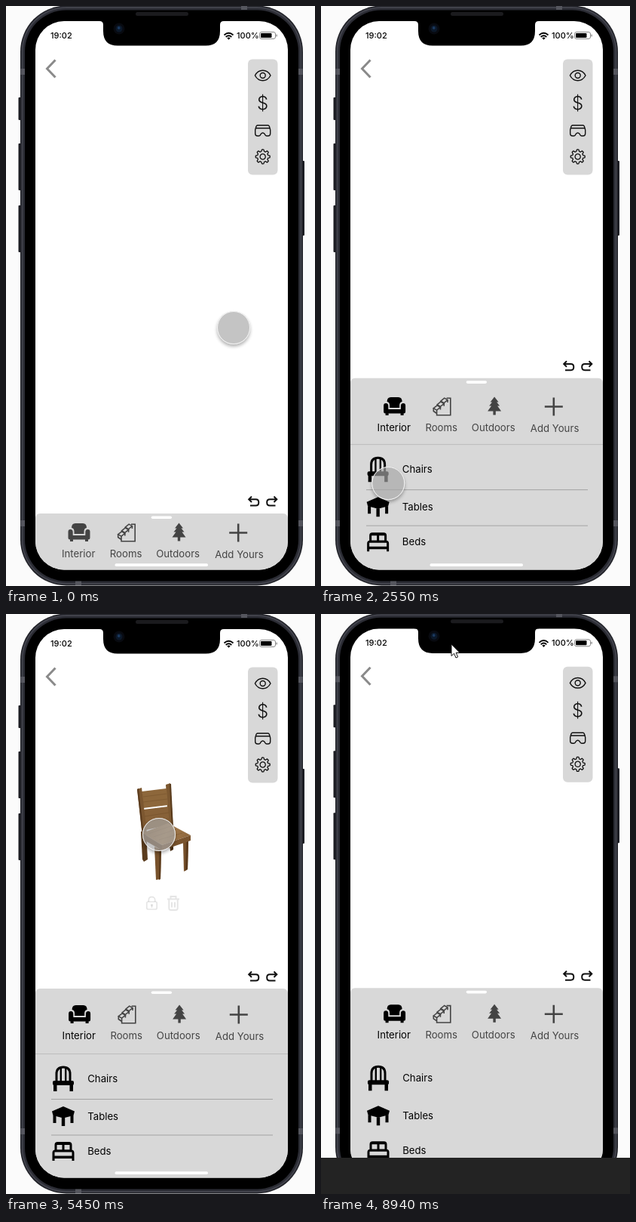
An HTML page with a canvas that plays this animation: 410x768 px, repeating every 8970 ms.

```html
<!DOCTYPE html>
<html lang="en">
<head>
<meta charset="utf-8">
<title>Room planner</title>
<style>
html, body { margin: 0; width: 100%; height: 100%; overflow: hidden; background: #fbfbfb; }
canvas { display: block; width: 410px; height: 768px; }
</style>
</head>
<body>
<canvas id="stage" width="410" height="768"></canvas>
<script>
const ctx = document.getElementById('stage').getContext('2d');
const LOOP = 8970;
const GRAY = '#d8d8d8';
const INK = '#444';

const clamp = v => Math.max(0, Math.min(1, v));

function box(x, y, w, h, r, fill) {
  ctx.beginPath();
  ctx.roundRect(x, y, w, h, r);
  ctx.fillStyle = fill;
  ctx.fill();
}

function at(x, y, alpha, draw) {
  if (alpha <= 0) return;
  ctx.save();
  ctx.globalAlpha *= alpha;
  ctx.translate(x, y);
  draw();
  ctx.restore();
}

function fill(d, color) {
  ctx.fillStyle = color;
  ctx.fill(new Path2D(d), 'evenodd');
}

function stroke(d, color, width) {
  ctx.strokeStyle = color;
  ctx.lineWidth = width;
  ctx.stroke(new Path2D(d));
}

function text(str, x, y, color, size = 13.2, weight = 400, align = 'left') {
  ctx.font = `${weight} ${size}px Inter, sans-serif`;
  ctx.textAlign = align;
  ctx.fillStyle = color;
  ctx.fillText(str, x, y);
}

// Damped spring: angular speed 10/s, damping ratio 0.75.
function spring(t, start) {
  const s = (t - start) / 100;
  if (s <= 0) return 0;
  if (s > 10) return 1;
  const z = 0.75, w = Math.sqrt(1 - z * z);
  return 1 - Math.exp(-z * s) * (Math.cos(w * s) + z / w * Math.sin(w * s));
}

// Opacity of the spring, mirrored past its end.
const fade = p => clamp(1 - Math.abs(1 - p));

const touchPath = [
  [0, 302, 426], [60, 302, 426], [250, 311, 425], [500, 230, 502],
  [910, 117, 602], [1300, 90, 704], [1670, 97, 698], [2100, 97, 698],
  [2750, 87, 613], [2850, 87, 613], [3210, 76, 611], [3700, 76, 611],
  [4050, 100, 550], [4390, 177, 404], [4450, 208, 350], [4600, 218, 282],
  [4900, 212, 285], [5300, 203, 292], [5900, 203, 292], [6210, 208, 327],
  [6270, 219, 359], [6420, 221, 382], [7800, 221, 382], [8060, 195, 131],
  [8150, 191, 64]
];

// Cubic path through the keys, at rest wherever two keys coincide.
function follow(keys, t) {
  const last = keys.length - 1;
  if (t >= keys[last][0]) return keys[last].slice(1);
  const i = keys.findIndex(k => k[0] > t) - 1;
  const a = keys[i], b = keys[i + 1];
  const span = b[0] - a[0], u = (t - a[0]) / span;
  const same = (p, q) => p[1] === q[1] && p[2] === q[2];
  const slope = (n, c) => {
    if (n === 0 || n === last) return 0;
    const p = keys[n - 1], k = keys[n], q = keys[n + 1];
    return same(p, k) || same(k, q) ? 0 : (q[c] - p[c]) / (q[0] - p[0]);
  };
  return [1, 2].map(c => {
    const v = 1 - u;
    return a[c] * (1 + 2 * u) * v * v + b[c] * u * u * (3 - 2 * u) +
      span * u * v * (slope(i, c) * v - slope(i + 1, c) * u);
  });
}

function phoneBody() {
  for (const [y, h] of [[121, 30], [182, 62], [264, 62]]) box(16.5, y, 5, h, 1, '#1c1d23');
  box(391, 205, 5, 99, 1, '#1c1d23');
  box(19, -0.5, 375, 768, 61, '#1f2026');
  box(20.5, 1, 372, 765, 59.5, '#41424b');
  box(22.5, 3, 368, 761, 57.5, '#2b2c34');
  ctx.fillStyle = '#55565e';
  for (const y of [83, 681]) {
    ctx.fillRect(19.5, y, 5.5, 8);
    ctx.fillRect(388, y, 5.5, 8);
  }
  ctx.fillRect(312, 0, 8, 5);
  ctx.fillRect(92, 761, 8, 6);
  box(25, 5.5, 363, 756, 55, '#000');
  box(172, 8, 70, 5, 2.5, '#1b1b1e');
}

function notch() {
  fill('M124 19V20Q129 20 129 25V33Q129 52.6 148 52.6H265Q284 52.6 284 33V25Q284 20 289 20V19Z', '#000');
  at(150, 30, 1, () => {
    box(-7.5, -7.5, 15, 15, 7.5, '#080a10');
    box(-4.5, -4.5, 9, 9, 4.5, '#0b1829');
    box(-2, -3, 3.5, 4, 1.8, '#1b395f');
  });
}

function statusBar() {
  text('19:02', 59, 43, '#000', 11, 500);
  text('100%', 306, 43, '#000', 11, 500);
  stroke('M289.5 38.5Q295.5 33 301.5 38.5M291.7 41Q295.5 37.5 299.3 41', '#000', 1.8);
  fill('M293.3 42.3Q295.5 40.5 297.7 42.3L295.5 44.7Z', '#000');
  ctx.strokeStyle = '#888';
  ctx.lineWidth = 1;
  ctx.beginPath();
  ctx.roundRect(336.5, 34.5, 21, 9, 2.5);
  ctx.stroke();
  box(338, 36, 14.5, 6, 1, '#000');
  box(358.5, 37.5, 1.3, 3, 0.6, '#888');
}

function gear() {
  ctx.beginPath();
  for (let i = 0; i < 96; i++) {
    const a = i / 96 * Math.PI * 2;
    const r = 8.3 + 1.2 * Math.tanh(3 * Math.cos(a * 8));
    ctx.lineTo(r * Math.cos(a), r * Math.sin(a));
  }
  ctx.closePath();
  ctx.moveTo(3.6, 0);
  ctx.arc(0, 0, 3.6, 0, 7);
  ctx.strokeStyle = '#111';
  ctx.lineWidth = 1.3;
  ctx.stroke();
}

function toolPanel() {
  box(321, 70.5, 39.5, 153, 6, GRAY);
  at(340.7, 92, 1, () => {
    stroke('M-10.3 0C-5.5-9 5.5-9 10.3 0C5.5 9-5.5 9-10.3 0Z', '#111', 1.4);
    stroke('M3.5 0A3.5 3.5 0 1 1-3.5 0A3.5 3.5 0 1 1 3.5 0Z', '#111', 1.4);
  });
  text('$', 340.7, 137, '#111', 24, 300, 'center');
  at(340.7, 165, 1, () => {
    stroke('M-7-7H7Q8.5-7 9.2-4L10-1V4Q10 7 7 7H5Q3.5 7 2.5 4.5Q0 1.5-2.5 4.5Q-3.5 7-5 7H-7Q-10 7-10 4V-1L-9.2-4Q-8.5-7-7-7ZM-9.2-3.3H9.2', '#111', 1.4);
  });
  at(340.7, 199.5, 1, gear);
}

function sofa(color) {
  fill('M-10-6Q-10-12-5-12H5Q10-12 10-6Q6.5-5.5 6.5-1V2H-6.5V-1Q-6.5-5.5-10-6Z', color);
  fill('M-14.5-1Q-14.5-4-11.5-4Q-8.3-4-8.3-.5V4H8.3V-.5Q8.3-4 11.5-4Q14.5-4 14.5-1V7Q14.5 9.5 12 9.5V12H8V9.5H-8V12H-12V9.5Q-14.5 9.5-14.5 7Z', color);
}

function stairs(color) {
  for (let i = 0; i < 3; i++) {
    at(4.8 * i, -4.8 * i, 1, () => stroke('M-11.3 2.2L-6.5-1.7L-2.2.8L-7 4.7Z', color, 1.5));
  }
  stroke('M-11.3 2V6L-7 9M-7 4.7V11.2H11.2V-11.2H6M-2.2.8V4M2.6-4V-.8M7.4-8.8V-5.6', color, 1.6);
}

function tree(color) {
  fill('M0-12.5L5.5-5.5H3L7-.5H4L9 6.5H1.7V11.5H-1.7V6.5H-9L-4-.5H-7L-3-5.5H-5.5Z', color);
}

// Tabs in their place on the open sheet.
function tabs(first) {
  at(97, 530, 1, () => sofa(first));
  at(160, 530.5, 1, () => stairs(INK));
  at(229.5, 530, 1, () => tree(INK));
  at(308.2, 530.5, 1, () => stroke('M-12 0H12M0-12V12', INK, 2.6));
  text('Interior', 74, 563, first);
  text('Rooms', 137.8, 563, INK);
  text('Outdoors', 199.2, 563, INK);
  text('Add Yours', 277.2, 563.5, INK);
}

function dividers() {
  ctx.fillStyle = '#bcbcbc';
  ctx.fillRect(39, 582, 335, 1);
  ctx.fillStyle = '#a3a3a3';
  ctx.fillRect(60, 642, 294, 1);
  ctx.fillRect(60, 689.5, 294, 1);
}

function list() {
  at(76, 615, 1, () => {
    stroke('M-9 4V-6Q-9-15 0-15Q9-15 9-6V4', '#000', 3);
    stroke('M-3.2 4V-14M3.2 4V-14', '#000', 2.4);
    box(-14, 3, 28, 6, 2, '#000');
    fill('M-13 8H-8.5V17H-13ZM8.5 8H13V17H8.5Z', '#000');
  });
  at(76, 665, 1, () => {
    fill('M0-13L15-6.5L13.5-1L0 2.5L-13.5-1L-15-6.5Z', '#000');
    fill('M-13.5-1H-9.5V9H-13.5ZM9.5-1H13.5V9H9.5ZM-2.2 2H2.2V13H-2.2Z', '#000');
  });
  at(76, 711.5, 1, () => {
    fill('M-11.5 0V-8.5Q-11.5-12.5-7.5-12.5H7.5Q11.5-12.5 11.5-8.5V0ZM-8.5-2V-8.5H-1.5V-2ZM1.5-2V-8.5H8.5V-2Z', '#000');
    fill('M-14.5 12.5V2Q-14.5-2-10.5-2H10.5Q14.5-2 14.5 2V12.5H11.5V9.5H-11.5V12.5ZM-11.5 6V1H11.5V6Z', '#000');
  });
  text('Chairs', 108.2, 620, '#000');
  text('Tables', 108.2, 669.5, '#000');
  text('Beds', 108.2, 715.5, '#000');
}

function historyArrow(x, y, dir) {
  at(x, y, 1, () => {
    ctx.scale(dir, 1);
    stroke('M-2.5-6.5L-6.3-2.7L-2.5 1M-6-2.7H3Q6.8-2.7 6.8 1.3Q6.8 5.5 3 5.5H-4.5', '#111', 2);
  });
}

function sheet(p, lines) {
  const y = 672 - 176 * p;
  historyArrow(328.5, y - 16, 1);
  historyArrow(353, y - 16, -1);
  box(39, y, 335, 300, [6, 6, 0, 0], GRAY);
  box(192.7, y + 3.5, 27.3, 3.6, 1.8, '#fff');
  const shown = clamp(p);
  at(-21 * p, 167 - 103 * p, 1 - shown, () => tabs(INK));
  at(21 * (1 - p), 103 * (1 - p), shown, list);
  if (lines) at(0, 103 * (1 - p), shown ** 3, dividers);
  at(0.6 * p, 0, shown, () => tabs('#000'));
  box(144.5, 738.3, 123.5, 3.7, 1.8, '#fff');
}

function woodChair() {
  fill('M179 288L186 289L188 325L183 328L181 325Z', '#5b3c1d');
  fill('M217 304H222V312L218 314Z', '#4a3016');
  fill('M235 303L242 300L241 338L236 341Z', '#77502a');
  fill('M239 302L242 300L241 338L238 340Z', '#5a3a1c');
  fill('M197 308L206 312L205 351L199 352Z', '#78522c');
  fill('M203 311L206 312L205 351L203 352Z', '#5c3c1d');
  fill('M212 226L218 224L222 284L216 285Z', '#7c5831');
  fill('M217 225L219 225L222 284L220 284Z', '#583a1c');
  fill('M180 235L213 231L215 253L182 257Z', '#8d673b');
  fill('M182 259L215 255L217 279L186 286Z', '#876138');
  fill('M174 232L180 230L187 291L181 294Z', '#7c5730');
  fill('M174 232L176 231L183 292L181 294Z', '#5b3c1e');
  const seat = ctx.createLinearGradient(183, 280, 240, 306);
  seat.addColorStop(0, '#855f35');
  seat.addColorStop(0.5, '#a87f50');
  seat.addColorStop(1, '#8b643a');
  fill('M181 290L215 277L245 293L207 306Z', seat);
  fill('M181 290L207 306V313L181 298Z', '#674525');
  fill('M207 306L245 293V300L207 313Z', '#79532d');
  ctx.globalAlpha *= 0.2;
  stroke('M182 242L213 238M182 249L214 245M184 268L216 263M185 276L216 271M189 291L218 281M196 295L226 285M203 299L234 290', '#4a2d12', 1);
}

function itemActions() {
  at(193.5, 383, 1, () => {
    stroke('M-4.2-2V-4Q-4.2-8.3 0-8.3Q4.2-8.3 4.2-4V-2', '#000', 1.7);
    ctx.beginPath();
    ctx.roundRect(-6.7, -2, 13.4, 10, 2);
    ctx.stroke();
    box(-1.6, 0.8, 3.2, 3.2, 1.6, '#000');
    box(-0.8, 2.5, 1.6, 3.5, 0.6, '#000');
  });
  at(222, 383, 1, () => {
    stroke('M-8-5.5H8M-3.5-6V-9H3.5V-6M-5.7-5V6.5Q-5.7 9-3.2 9H3.2Q5.7 9 5.7 6.5V-5M-2-1.5V5.5M2-1.5V5.5', '#000', 2);
  });
}

function touchDot(x, y, pressed) {
  at(x, y, 1, () => {
    // Shadow only outside the translucent disc.
    ctx.save();
    ctx.beginPath();
    ctx.rect(-40, -40, 80, 80);
    ctx.arc(0, 0, 22, 0, 7);
    ctx.clip('evenodd');
    ctx.shadowColor = 'rgba(0,0,0,.3)';
    ctx.shadowBlur = 4;
    ctx.shadowOffsetY = 3;
    box(-22, -22, 44, 44, 22, '#fff');
    ctx.restore();
    box(-22, -22, 44, 44, 22, pressed ? 'rgba(90,90,90,.4)' : 'rgba(167,167,167,.67)');
    ctx.beginPath();
    ctx.arc(0, 0, 21.5, 0, 7);
    ctx.strokeStyle = 'rgba(255,255,255,.85)';
    ctx.lineWidth = 1;
    ctx.stroke();
  });
}

function pointer(x, y) {
  at(x, y, 1, () => {
    const arrow = 'M0 0V15.5L3.6 12.2L6 18L8.6 16.9L6.2 11.3H11Z';
    fill(arrow, '#fff');
    stroke(arrow, '#111', 1);
  });
}

function render(t) {
  const ending = t >= 8880;
  ctx.fillStyle = '#fbfbfb';
  ctx.fillRect(0, 0, 410, 768);

  at(0, ending ? -0.7 : 0, 1, () => {
    phoneBody();
    ctx.save();
    ctx.beginPath();
    ctx.roundRect(39, 20, 335, 726.5, 38);
    ctx.clip();
    ctx.fillStyle = '#fff';
    ctx.fillRect(39, 20, 335, 727);
    statusBar();
    stroke('M65.5 71.5L54.5 83L65.5 94.5', '#8a8a8a', 3);
    toolPanel();
    const removed = fade(spring(t, 7180));
    at(0, 0, fade(spring(t, 3690)) * (1 - removed), woodChair);
    at(0, 0, fade(spring(t, 5400)) * (1 - removed), itemActions);
    sheet(spring(t, 1962), !ending);
    ctx.restore();
    notch();
  });

  if (t < 8165) {
    touchDot(...follow(touchPath, t), t >= 3520 && t < 3700);
  } else {
    const u = clamp((t - 8165) / 535);
    const rest = (1 - u) ** 3;
    pointer(173 + 15 * rest, 40 + 18 * rest);
  }

  if (ending) {
    const height = 16 * Math.min(3, 1 + Math.floor((t - 8880) / 30));
    ctx.fillStyle = '#232323';
    ctx.fillRect(0, 768 - height, 410, height);
  }
}

const begin = performance.now();
function tick() {
  render((performance.now() - begin) % LOOP);
  requestAnimationFrame(tick);
}
tick();
</script>
</body>
</html>
```
